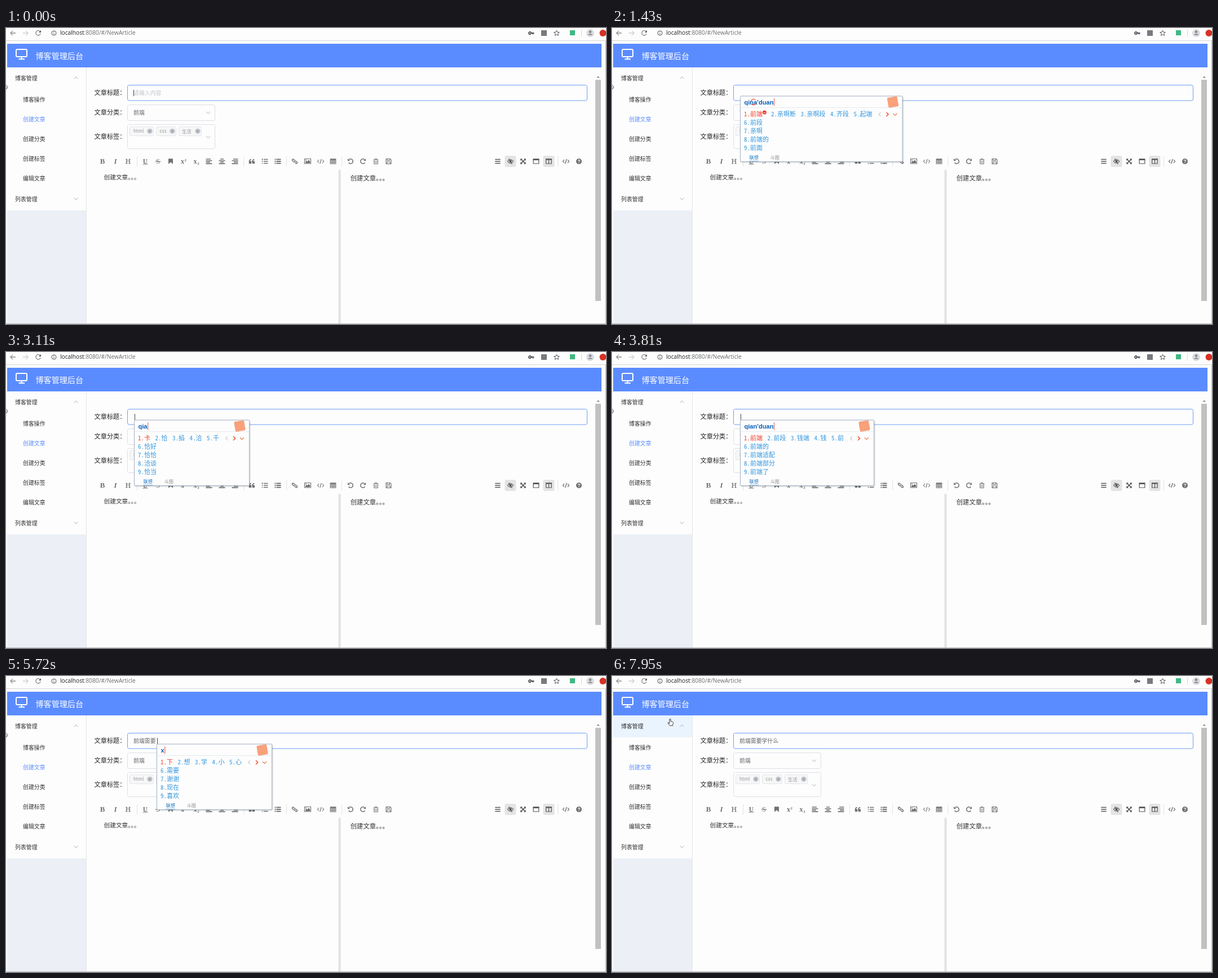
An HTML page for the animation above (8 s loop, 1064 by 526 pixels).

```html
<!DOCTYPE html>
<html lang="zh-CN">
<head>
<meta charset="utf-8">
<title>博客管理后台</title>
<style>
  html, body { margin: 0; width: 100%; height: 100%; overflow: hidden; background: #fdfdfd; }
  svg { display: block; width: 100%; height: 100%; }
  text { font-family: "Noto Sans CJK SC", "Noto Sans CJK", sans-serif; white-space: pre; }
  .url { font: 10.2px "Open Sans", sans-serif; }
  .menu { font-size: 9.9px; fill: #303133; }
  .field { font-size: 9.9px; fill: #606266; }
  .label { font-size: 11.2px; fill: #222; }
  .line { fill: none; stroke-width: 1; }
  .tag { font-size: 8.4px; fill: #909399; }
  .serif { font-family: "Liberation Serif", serif; }
  #tools text { fill: #707070; text-anchor: middle; }
  .cand { font: 11px "Noto Sans Mono CJK SC", "Noto Sans CJK SC", monospace; fill: #3296df; }
  .pinyin { font: bold 11.1px "Liberation Sans", sans-serif; fill: #0b5fb8; }
  .tab { font-size: 8.2px; }
  #popup > rect:first-child { filter: drop-shadow(1px 1px 1px #0003); }
</style>
</head>
<body>
<svg viewBox="0 0 1064 526">
  <defs>
    <path id="down" d="M-3.5-1.7L0 1.7L3.5-1.7" fill="none" stroke="#a8abb2"/>
    <g id="close">
      <circle r="4.6" fill="#c0c4cc"/>
      <path d="M-1.7-1.7L1.7 1.7M1.7-1.7L-1.7 1.7" stroke="#858a93"/>
    </g>
  </defs>
  <rect width="1064" height="526" fill="#fdfdfd"/>

  <!-- browser bar -->
  <g class="line" stroke="#505357" stroke-width="1.4">
    <path d="M17 9H8M12 4.8L7.8 9L12 13.2"/>
    <path d="M30 9H39M35 4.8L39.2 9L35 13.2" stroke="#b4b6b9"/>
    <path d="M60.6 6.2A4.3 4.3 0 1 0 61.3 10"/>
    <path d="M62 4V8H58Z" fill="#505357" stroke="none"/>
    <circle cx="85" cy="9" r="4"/>
    <path d="M85 8.3V11.3M85 6.3V7.4"/>
    <circle cx="929" cy="9" r="2" stroke-width="1.8"/>
    <path d="M931 9H936.5M934.5 9V11.5" stroke-width="1.8"/>
    <path d="M976.5 4.2L977.9 7.4L981.3 7.7L978.7 9.9L979.5 13.3L976.5 11.5L973.5 13.3L974.3 9.9L971.7 7.7L975.1 7.4Z"/>
  </g>
  <rect x="949" y="4" width="10" height="10" fill="#777a7e"/>
  <rect x="1000" y="4" width="9" height="9" fill="#41b883"/>
  <path d="M1020.5 3V15" stroke="#d5d7da"/>
  <circle cx="1036" cy="9" r="7" fill="#dadce0"/>
  <circle cx="1036" cy="6.8" r="2.3" fill="#85898e"/>
  <path d="M1031.5 12.6Q1036 7.5 1040.5 12.6Z" fill="#85898e"/>
  <circle cx="1058.5" cy="9" r="6" fill="#d93025"/>
  <text class="url" x="96" y="12.4" fill="#202124">localhost<tspan fill="#6b6e72">:8080/#/NewArticle</tspan></text>
  <path d="M0 22.5H1064" stroke="#d6d6d6"/>

  <!-- header -->
  <rect x="2" y="28" width="1054" height="42" fill="#5b8cff"/>
  <rect x="18" y="38" width="19" height="13" rx="2" fill="none" stroke="#fff" stroke-width="2"/>
  <path d="M27.5 51V55M22.5 55.3H33" stroke="#fff" stroke-width="2"/>
  <text x="52.5" y="55" font-size="14.1" fill="#fff">博客管理后台</text>

  <!-- sidebar -->
  <rect x="2" y="324" width="140" height="202" fill="#ecf0f6"/>
  <rect id="hover" x="2" y="70" width="140" height="39" fill="#eaf4fe"/>
  <path d="M142.5 70V526" stroke="#e6e6e6"/>
  <g class="menu">
    <text x="16" y="93.2">博客管理</text>
    <text x="30" y="130.6">博客操作</text>
    <text x="30" y="165.6" fill="#5b8cff">创建文章</text>
    <text x="30" y="200.6">创建分类</text>
    <text x="30" y="235.8">创建标签</text>
    <text x="30" y="270.6">编辑文章</text>
    <text x="16" y="307.8">列表管理</text>
  </g>
  <use href="#down" transform="translate(124 88.5) scale(1 -1)"/>
  <use href="#down" x="124" y="303.5"/>

  <!-- form -->
  <g class="label">
    <text x="156.5" y="119">文章标题：</text>
    <text x="156.5" y="154.4">文章分类：</text>
    <text x="156.5" y="196.6">文章标签：</text>
  </g>
  <rect class="line" x="215.5" y="101.5" width="815" height="27.5" rx="3" stroke="#6d9df5"/>
  <g class="line" stroke="#dcdfe6">
    <rect x="215.5" y="136.5" width="155" height="28" rx="3"/>
    <rect x="215.5" y="171.5" width="155" height="43" rx="3"/>
  </g>
  <text class="field" x="226" y="154">前端</text>
  <use href="#down" x="358.5" y="150.5"/>
  <use href="#down" x="358.5" y="194"/>
  <g fill="#f7f7f8" stroke="#e4e5e9">
    <rect x="219.5" y="175.5" width="42" height="16" rx="2.5"/>
    <rect x="266.5" y="175.5" width="35" height="16" rx="2.5"/>
    <rect x="306.5" y="175.5" width="40" height="16" rx="2.5"/>
  </g>
  <g class="tag">
    <text x="226" y="186.4">html</text>
    <text x="272.5" y="186.4">css</text>
    <text x="312" y="186.6">生活</text>
  </g>
  <use href="#close" x="255" y="183.3"/>
  <use href="#close" x="295" y="183.3"/>
  <use href="#close" x="340" y="183.3"/>

  <!-- editor -->
  <g fill="#e4e4e4">
    <rect x="884.5" y="227" width="20" height="20" rx="3"/>
    <rect x="952.5" y="227" width="20" height="20" rx="3"/>
  </g>
  <g id="tools"></g>
  <rect x="589.5" y="252" width="4" height="274" fill="#e2e2e2"/>
  <text x="173.5" y="269" font-size="10.7" fill="#333">创建文章。。。</text>
  <text x="610.8" y="270.7" font-size="11.3" fill="#333">创建文章。。。</text>
  <rect x="1045" y="92" width="10" height="393" fill="#c1c1c1"/>
  <path d="M1047.5 88.5H1053L1050.2 85.5Z" fill="#8a8a8a"/>
  <path d="M1063.5 23V526M0 525.5H1064" stroke="#bdbdbd"/>

  <text id="value" class="field" x="226" y="119"/>
  <path id="caret" stroke="#444"/>
  <g id="popup"></g>
  <path id="arrow" d="M0 101L3.3 105H1.5L2 108H0" fill="#fff" stroke="#555" stroke-width=".9"/>
  <path id="hand" d="M3.5 9V1.3Q4.6-.2 5.6 1.3V5L9 6Q10.3 6.4 10.1 8L9.2 11V12.6H4L.7 8.4Q.3 6.8 2 7.3Z" fill="#fff" stroke="#222" stroke-width=".9"/>
</svg>
<script>
const $ = id => document.getElementById(id);
const text = (cls, x, y, s, more = '') => `<text class="${cls}" x="${x}" y="${y}" ${more}>${s}</text>`;
const path = (d, stroke, width = 1) => `<path d="${d}" fill="none" stroke="${stroke}" stroke-width="${width}"/>`;

// Toolbar: [x, strokes, stroke width, filled shapes], around the icon's centre
const code = 'M-3-3L-5.5 0L-3 3M3-3L5.5 0L3 3M1.1-4L-1.1 4';
const turn = 'M-2.8-3.2A4.2 4.2 0 1 1-3.4 2.3';
const icons = [
  [292, '', 1, 'M-4-4.7H4V4.8L0 1.3L-4 4.8Z'],
  [360, 'M-5.5-4H3M-5.5-1.3H5.5M-5.5 1.4H2M-5.5 4.1H5.5', 1.6],
  [383, 'M-3-4H3M-5.5-1.3H5.5M-3 1.4H3M-5.5 4.1H5.5', 1.6],
  [406, 'M-3-4H5.5M-5.5-1.3H5.5M-2 1.4H5.5M-5.5 4.1H5.5', 1.6],
  [436, 'M-4.4 1Q-4.6-3-1.3-3.4M1.1 1Q.9-3 4.2-3.4', 1.6, 'M-5.2-.5H-.8V4H-5.2ZM.6-.5H5V4H.6Z'],
  [459, 'M-2-3.5H5.5M-2 0H5.5M-2 3.5H5.5M-4.4-5V-2M-5.2 0H-3.6M-5.2 3.5H-3.6', 1.4],
  [482, 'M-2.5-3.5H5.5M-2.5 0H5.5M-2.5 3.5H5.5M-5.5-3.5H-3.6M-5.5 0H-3.6M-5.5 3.5H-3.6', 1.9],
  [512, 'M0-1.5L-2-3.7Q-3.4-4.4-4.3-3Q-4.8-2-4-1.3L-2 .6Q-.9 1 0 .2M0 1.5L2 3.7Q3.4 4.4 4.3 3Q4.8 2 4 1.3L2-.6Q.9-1 0-.2', 1.5],
  [535, 'M-5.5-4.5H5.5V4H-5.5Z', 1.1, 'M-4 3V1L-2-1L-.8.3L2-2.5L4.2 0V3ZM-4-2.2A1 1 0 1 1-2-2.2A1 1 0 1 1-4-2.2Z'],
  [558, code, 1.1],
  [580, 'M-4.8-4H4.8V4.2H-4.8ZM-4.8-1H4.8M-4.8 1.6H4.8M-1.6-4V4.2M1.6-4V4.2', 1.1, 'M-5-4.5H5V-2.3H-5Z'],
  [611, turn, 1.5, 'M-5-5V-.8H-.8Z'],
  [633, turn, 1.5, 'M-5-5V-.8H-.8Z', -1],
  [656, 'M-4.3-3H4.3M-3.3-3V4.5H3.3V-3M-1.6-3V-4.6H1.6V-3M-1.2-1V3M1.2-1V3', 1],
  [678.5, 'M-4.5-4.5H2.8L4.5-2.8V4.5H-4.5ZM-2.5-4.5V-1.5H2V-4.5M-2.7 4.5V1H2.7V4.5', 1.1],
  [872, 'M-4.7-3.5H4.7M-4.7 0H4.7M-4.7 3.5H4.7', 1.6],
  [894.5, 'M-5.2 0Q0-6.5 5.2 0Q0 6.5-5.2 0M-3-5L3 5', 1.2, 'M-2.2-.3A2.2 2.2 0 1 1 2.2-.3A2.2 2.2 0 1 1-2.2-.3'],
  [917, 'M-3.5-3.5L3.5 3.5M3.5-3.5L-3.5 3.5', 1.7, 'M-4.8-4.8H-1L-4.8-1ZM4.8-4.8V-1L1-4.8ZM-4.8 4.8V1L-1 4.8ZM4.8 4.8H1L4.8 1Z'],
  [940, 'M-4.8-4H4.8V4H-4.8Z', 1.2, 'M-5.3-4.6H5.3V-2H-5.3Z'],
  [962.5, 'M-4.8-4H4.8V4H-4.8ZM0-4V4', 1.2, 'M-5.3-4.6H5.3V-2.5H-5.3Z'],
  [993, code, 1.1],
  [1016, '', 1, 'M-5 0A5 5 0 1 1 5 0A5 5 0 1 1-5 0Z'],
];
const letter = (x, s, more, size = 13) =>
  text('serif', x, 241.3, s, `font-size="${size}" ${more}`);
$('tools').innerHTML =
  icons.map(([x, d, w, fill = '', flip = 1]) => {
    const color = x > 860 && x < 1000 ? '#555' : '#707070';
    return `<g transform="translate(${x} 237) scale(${flip} 1)">${path(d, color, w)}<path d="${fill}" fill="${color}"/></g>`;
  }).join('') +
  [232.5, 421.5, 497.5, 595.5, 978.5].map(x => path(`M${x} 228V246`, '#e3e3e3')).join('') +
  letter(171, 'B', 'font-weight="bold"') +
  letter(194, 'I', 'font-weight="bold" font-style="italic"') +
  letter(216.5, 'H', 'stroke="#707070" stroke-width=".3"') +
  letter(247, 'U', 'font-weight="bold"', 11.5) + path('M242.5 242H251.5', '#707070') +
  letter(269.5, 'S', '', 12.5) + path('M264.5 237.2H274.5', '#707070') +
  letter(313, 'x', 'font-weight="bold"', 12) + text('serif', 318.2, 236.5, '2', 'font-size="7" font-weight="bold"') +
  letter(335.5, 'x', 'font-weight="bold"', 12) + text('serif', 341, 243, '2', 'font-size="7" font-weight="bold"') +
  text('pinyin', 1016, 240, '?', 'style="fill:#fdfdfd;font-size:8.5px"');

// [start, typed text, caret, pinyin, candidates]; "+" marks a corrected candidate, "@" an eye
const steps = [
  [0, '', 1], [280, '', 0],
  [650, '', 0, 'q', '去 请 起 前 钱 其实 全部 情况 去了'],
  [790, '', 0, 'qi', '起 其 气 七 期 其实 起来 其他 气死'],
  [930, '', 0, 'qin', '亲 琴 勤 秦 芹 亲爱的 勤奋 亲自 亲戚'],
  [1070, '', 0, 'qina', '钱+ 齐纳 亲啊 齐娜 祁娜 $_$ 前端 前端的 前面'],
  [1190, '', 0, "qina'd", '前段+ 前端 亲啊 启动 七段 前端的 前度 齐的 起的'],
  [1310, '', 0, "qina'du", '前度+ 亲啊度 前都 起读 齐度 前端 前途 前度的 亲啊'],
  [1430, '', 0, "qina'duan", '前端+ 亲啊断 亲啊段 齐段 起端 前段 亲啊 前端的 前面'],
  [1710, '亲啊断', 1], [1990, '亲啊', 1], [2140, '亲', 1], [2290, '', 1], [2440, '', 0],
  [2840, '', 1, 'q', '去 请 起 前 钱 其实 全部 情况 去了'],
  [2980, '', 1, 'qi', '起 其 气 七 期 其实 起来 其他 气死'],
  [3110, '', 1, 'qia', '卡 恰 掐 洽 千 恰好 恰恰 洽谈 恰当'],
  [3390, '', 1, 'qian', '前 钱 千 欠 签 前端 前面 钱包 签到'],
  [3530, '', 1, "qian'd", '前端 前段 前的 签到 钱的 前端的 前端适配 前度 前代'],
  [3670, '', 1, "qian'du", '前端 前度 前段 千度 迁都 前端的 前端适配 钱都 前途'],
  [3810, '', 1, "qian'duan", '前端 前段 钱端 钱 前 前端的 前端适配 前端部分 前端了'],
  [4090, '前端', 1],
  [4370, '前端', 0, 'xu', '需 许 续 徐 须 需要 许多 需求 虚拟'],
  [4520, '前端', 0, "xu'y", '需要 须要 许愿 虚拟 续约 需要的 需要你 许一 需用'],
  [4880, '前端', 0, "xu'yao", '需要 须要 徐瑶 许瑶 徐耀 需要的 需要你 需要多少 需要就'],
  [5010, '前端需要', 1], [5440, '前端需要', 0],
  [5720, '前端需要', 1, 'x', '下 想 学 小 心 需要 谢谢 现在 喜欢'],
  [5840, '前端需要', 1, 'xu', '需 许 续 徐 须 需要 许多 需求 虚拟'],
  [6240, '前端需要', 1, 'xue', '学 雪 血 削 穴 学习 学会 学校 学生'],
  [6380, '前端需要', 1, "xue's", '学生 雪山 学士 血色 学时 学什么 学神 雪松 学术'],
  [6520, '前端需要', 1, "xue'sh", '学生 学时 学会 雪山 学神 学什么 学术 学士 学识'],
  [6660, '前端需要', 1, "xue'shen", '血神 雪神 雪糁 学 薛 学什么 学什么的 @ @'],
  [6970, '前端需要', 1, "xue'shen'me", '学什么 血神 雪神 学神 学 学什么的 学什么好 @ @'],
  [7090, '前端需要学什么', 1], [7680, '前端需要学什么', 0],
];

const measure = document.createElement('canvas').getContext('2d');
measure.font = 'bold 11.1px "Liberation Sans", sans-serif';

function popup(left, pinyin, list) {
  const x0 = left + 6.5, words = list.split(' ');
  let x = x0, out = '';
  words.slice(0, 5).forEach((word, i) => {
    const name = word.replace('+', '');
    out += text('cand', x, 156.7, `${i + 1}.${name}`, i ? '' : 'style="fill:#f2412c"');
    x += 11 * (name.length + 1);
    if (word !== name) {
      out += `<circle cx="${x + 3.5}" cy="150" r="3.4" fill="#e8382e"/>` +
        path(`M${x + 1.8} 150l1.4 1.4l2.3-2.6`, '#fff') +
        path(`M${left + 19} 130a4.6 4.6 0 0 1 8-2m1 5a4.6 4.6 0 0 1-8 2`, '#ee4a42', 1.3);
      x += 6.5;
    }
    x += 8.5;
  });
  x -= 8.5;
  words.slice(5).forEach((word, i) => {
    const y = 171.7 + 15 * i;
    out += text('cand', x0, y, `${i + 6}.${word.replace('@', '')}`);
    if (word === '@') out += path(`M${x0 + 11} ${y - 4}q5-6 10 0q-5 6-10 0m3.5 0a1.5 1.5 0 1 0 3 0a1.5 1.5 0 1 0-3 0`, '#3296df');
  });
  const right = x + 53.5, end = x0 + 1.2 + measure.measureText(pinyin).width;
  return `<rect x="${left}" y="121" width="${right - left}" height="116.5" rx="1.5" fill="#fdfdfd" stroke="#a5b2c6"/>` +
    path(`M${left + 1} 141.5H${right - 1}`, '#e6e9ee') +
    text('pinyin', x0 + .5, 135.6, pinyin) + path(`M${end + .5} 125V138.5`, '#d8524a') + out +
    `<rect x="${right - 26}" y="122.5" width="18" height="18" rx="2" fill="#f8a17b" transform="rotate(-10 ${right - 17} 131.5)"/>` +
    path(`M${x + 15} 150l-3.5 3.5l3.5 3.5`, '#ccc', 1.2) +
    path(`M${x + 25} 150l3.5 3.5l-3.5 3.5`, '#f2593c', 1.7) +
    path(`M${x + 37} 152l3.5 3.5l3.5-3.5`, '#f58a68', 1.5) +
    text('tab', left + 16, 233.4, '联想', 'fill="#1b75c0"') +
    text('tab', left + 53, 233.4, '斗图', 'fill="#888"') +
    path(`M${left + 16} 236.3h16.5`, '#7ab4e4');
}

let shown;
function draw() {
  const t = performance.now() % 8000;
  const step = steps.findLast(s => s[0] <= t);
  if (step !== shown) {
    shown = step;
    const [, typed, caret, pinyin, list] = step;
    const x = 226.5 + 9.9 * typed.length + (pinyin ? 2 : 0);
    $('value').textContent = typed || (pinyin ? '' : '请输入内容');
    $('value').style.fill = typed ? '' : '#c0c4cc';
    $('caret').setAttribute('d', caret ? `M${Math.floor(x) + .5} 110V121` : '');
    $('popup').innerHTML = pinyin ? popup(Math.floor(227.7 + 9.9 * typed.length) + .5, pinyin, list) : '';
  }
  const moved = t >= 7820, over = t >= 7950;
  $('hover').style.opacity = over ? 1 : moved ? .5 : 0;
  $('arrow').style.opacity = moved ? 0 : 1;
  $('hand').style.opacity = moved ? 1 : 0;
  $('hand').setAttribute('transform', over ? 'translate(98.5 75.5)' : 'translate(62 88)');
  requestAnimationFrame(draw);
}
draw();
</script>
</body>
</html>
```
